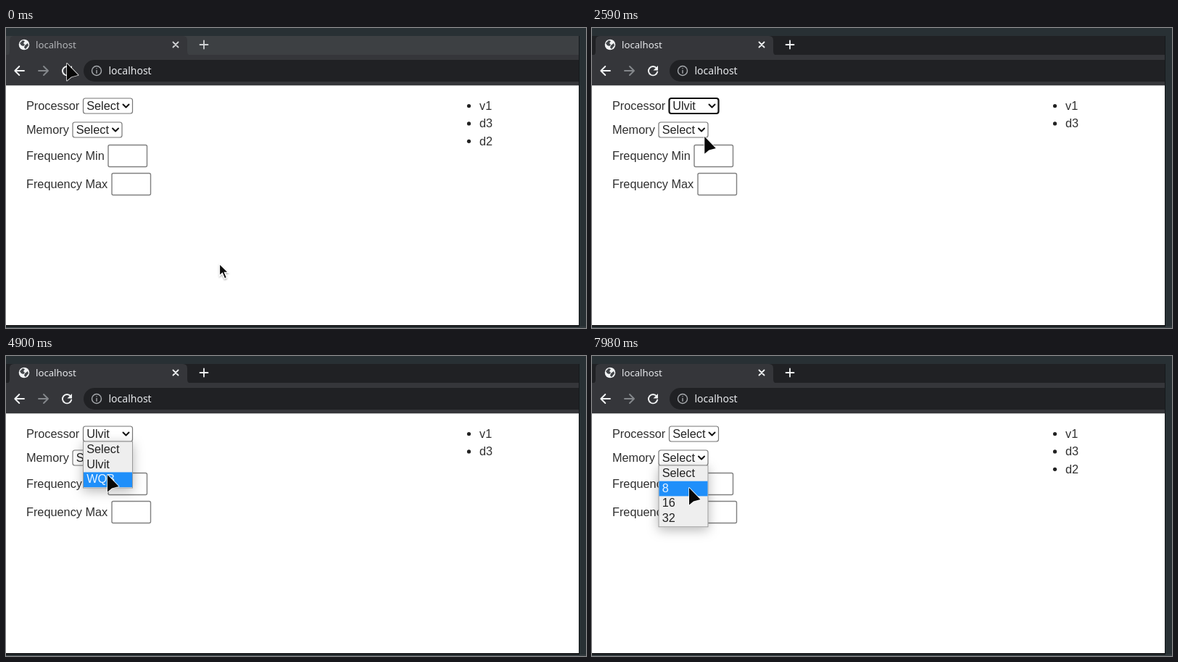
These frames come from a looping animation (800x414 px, 8 s). An HTML page:

```html
<!DOCTYPE html>
<html lang="en">
<head>
<meta charset="utf-8">
<title>Filter form</title>
<style>
  html, body { margin: 0; width: 100%; height: 100%; overflow: hidden; background: #283034; }
  svg { display: block; width: 100vw; height: 100vh; }
  .page { font: 16.3px "Liberation Sans", Arial, sans-serif; fill: #303030; }
  .bar { font-family: "Noto Sans", "Open Sans", sans-serif; font-weight: 500; }
  .line { fill: none; stroke-linecap: round; stroke-linejoin: round; }
</style>
</head>
<body>
<svg id="stage" viewBox="0 0 800 414" preserveAspectRatio="none">
  <defs>
    <filter id="shade" x="-50%" y="-50%" width="200%" height="200%">
      <feDropShadow dx="0" dy="4" stdDeviation="8" flood-opacity=".28"/>
    </filter>
    <filter id="soft" x="-50%" y="-50%" width="200%" height="200%">
      <feDropShadow dx="0" dy="1.5" stdDeviation="1" flood-opacity=".35"/>
    </filter>
  </defs>
  <rect width="800" height="414" fill="#283034"/>
  <rect y="11" width="790" height="403" fill="#202124"/>
  <g id="tabs" class="bar"></g>
  <rect y="37" width="790" height="42" fill="#35363a"/>
  <path d="M790 44H122a15 15 0 0 0 0 30H790Z" fill="#202124"/>
  <g class="line" stroke="#f1f3f4" stroke-width="1.9">
    <path d="M25 59H12.5M18.3 53l-6 6 6 6"/>
    <path d="M45 59H57.5M52 53l6 6-6 6" stroke="#84878b"/>
    <path d="M89 55.3A6.2 6.2 0 1 0 90.2 60.5"/>
  </g>
  <path d="M91 52v6.500h-6.500Z" fill="#f1f3f4"/>
  <g class="line" stroke="#a6a9ad" stroke-width="1.4">
    <circle cx="125" cy="59" r="6.5"/>
    <path d="M125 58.5v3.7M125 55.7v.1"/>
  </g>
  <text class="bar" x="141.500" y="63.500" font-size="14" fill="#e8eaed">localhost</text>
  <rect y="79" width="790" height="331" fill="#fff"/>
  <rect y="79" width="790" height="1" fill="#c4c5c6"/>
  <path d="M790.5 11V411" stroke="#15191c"/>
  <rect y="410.500" width="791" height="1.500" fill="#0b0d0e"/>
  <rect y="412" width="800" height="2" fill="#343b3f"/>
  <g class="page">
    <text x="28" y="113">Processor</text>
    <text x="28" y="146">Memory</text>
    <text x="28" y="182">Frequency Min</text>
    <text x="28" y="221">Frequency Max</text>
    <g fill="#fff" stroke="#808080" stroke-width="1.400">
      <rect x="141" y="161.500" width="53.500" height="30" rx="2"/>
      <rect x="146" y="200.500" width="53.500" height="30" rx="2"/>
    </g>
    <g id="form"></g>
  </g>
  <path id="idle" d="M0 0V16.300L3.900 12.800 7 20.200 10 19 6.900 11.800H12Z" transform="translate(294.500 325.500)"
    fill="#111" stroke="#fff" stroke-width="1.200" filter="url(#soft)"/>
  <path id="pointer" d="M0 0V23.500L6 18.500 15.500 16Z" fill="#080808" stroke="#fff" stroke-opacity=".8"
    stroke-width="1.800" stroke-linejoin="round" paint-order="stroke"/>
</svg>
<script>
const $ = id => document.getElementById(id);
const LOOP = 8000, STEP = 70, ROW = 20.7;
const CPUS = ["Select", "Ulvit", "WQB"];
const SIZES = ["Select", "8", "16", "32"];

// Pointer stops: time, x, y
const STOPS = [
  [0, 84, 49], [900, 84, 49], [1480, 159, 107], [1600, 159, 107], [1820, 157, 128],
  [2150, 151, 147], [2450, 151, 147], [3100, 187, 173], [3600, 187, 173],
  [4150, 151, 105], [4400, 151, 105], [4800, 140, 164], [5200, 140, 164],
  [5700, 151, 105], [6100, 151, 105], [6400, 149, 127], [6600, 149, 127],
  [7070, 116, 143], [7400, 116, 143], [7800, 134, 182], [LOOP, 134, 182]
];
const FOCUS_AT = 910, MEMORY_AT = 7400;
const PICKS = [[0, 0], [2400, 1], [5150, 2], [6550, 0]];
const OPENINGS = [[1580, 2400], [4300, 5150], [6150, 6550]];

function pointerAt(t) {
  const i = Math.max(1, STOPS.findIndex(s => s[0] > t));
  const [t0, x0, y0] = STOPS[i - 1], [t1, x1, y1] = STOPS[i];
  const u = (t - t0) / (t1 - t0), k = u * u * (3 - 2 * u);
  return [x0 + (x1 - x0) * k, y0 + (y1 - y0) * k];
}

const text = (x, y, s, fill = "#222") => `<text x="${x}" y="${y}" fill="${fill}">${s}</text>`;

function tabBar(active) {
  const ink = active ? "#e8eaed" : "#b4b6b9";
  return `<rect y="11" width="790" height="27" fill="${active ? "#202124" : "#3d4043"}"/>
    <path d="M0 38Q5 38 5 32V17Q5 11 11 11H244Q250 11 250 17V32Q250 38 256 38Z" fill="#35363a"/>
    <circle cx="25" cy="23" r="7.3" fill="#f1f3f4"/>
    <path d="M19 21l4-4 3 1-2 3 2 2-2 2-3-1ZM26 24l4-3 1 3-4 5-2-2Z" fill="#43464a"/>
    <text x="41" y="28" font-size="13.2" fill="${ink}">localhost</text>
    <g class="line" stroke="${active ? "#f1f3f4" : "#d0d2d4"}" stroke-width="1.8">
      <path d="M230.5 19.5l7 7m0-7l-7 7M267.5 23h11M273 17.5v11"/></g>`;
}

function select(x, y, label, focused) {
  const edge = focused ? `stroke="#111" stroke-width="2.2"` : `stroke="#777" stroke-width="1.2"`;
  return `<rect x="${x}" y="${y}" width="68" height="21" rx="3" fill="#fff" ${edge}/>
    ${text(x + 4.7, y + 16, label)}
    <path class="line" d="M${x + 55} ${y + 8.5}l4 4 4-4" stroke="#111" stroke-width="2"/>`;
}

function menu(x, y, items, chosen, py) {
  const over = Math.floor((py - y - 1) / ROW);
  const lit = over >= 0 && over < items.length ? over : chosen;
  const h = items.length * ROW + 2;
  return `<rect x="${x}" y="${y}" width="68" height="${h}" fill="#eee" stroke="#999" filter="url(#shade)"/>
    <rect x="${x + .5}" y="${y + 1 + lit * ROW}" width="67" height="${ROW}" fill="#1f8ffa"/>` +
    items.map((s, i) => text(x + 4.7, y + 16 + i * ROW, s, i === lit ? "#e6f3ff" : "#222")).join("");
}

const spinner = `<rect x="176" y="164.5" width="15" height="11.5" fill="#c4c4c4"/>
  <rect x="176" y="176" width="15" height="11.5" fill="#e8e8e8"/>
  <path d="M179.5 173.5l3.7-4 3.7 4ZM179.5 180l3.7 4 3.7-4Z" fill="#444"/>`;

function list(items) {
  return items.map((s, i) => {
    const y = 113 + i * 24.4;
    return `<circle cx="638.5" cy="${y - 5.5}" r="2.6" fill="#222"/>` + text(653, y, s, "#303030");
  }).join("");
}

function draw(t) {
  const [x, y] = pointerAt(t);
  const cpu = PICKS.filter(p => p[0] <= t).pop()[1];
  const cpuOpen = OPENINGS.some(([a, b]) => t >= a && t < b);
  const memOpen = t >= MEMORY_AT;
  const ring = t >= PICKS[1][0] && !cpuOpen && !memOpen;
  const inMin = x > 141 && x < 195 && y > 161 && y < 192 && !cpuOpen && !memOpen;

  $("tabs").innerHTML = tabBar(t >= FOCUS_AT);
  $("form").innerHTML =
    select(106.5, 97, CPUS[cpu], ring) +
    select(92, 130, "Select", false) +
    (inMin ? spinner : "") +
    list([["v1", "d3", "d2"], ["v1", "d3"], ["d2"]][cpu]) +
    (cpuOpen ? menu(106.5, 118, CPUS, cpu, y) : "") +
    (memOpen ? menu(92, 151, SIZES, 0, y) : "");
  $("idle").style.display = t < FOCUS_AT ? "" : "none";
  $("pointer").setAttribute("transform", `translate(${x} ${y})`);
}

let last = -1;
const start = performance.now();
function tick() {
  const t = Math.floor((performance.now() - start) % LOOP / STEP) * STEP;
  if (t !== last) draw(last = t);
  requestAnimationFrame(tick);
}
tick();
</script>
</body>
</html>
```
